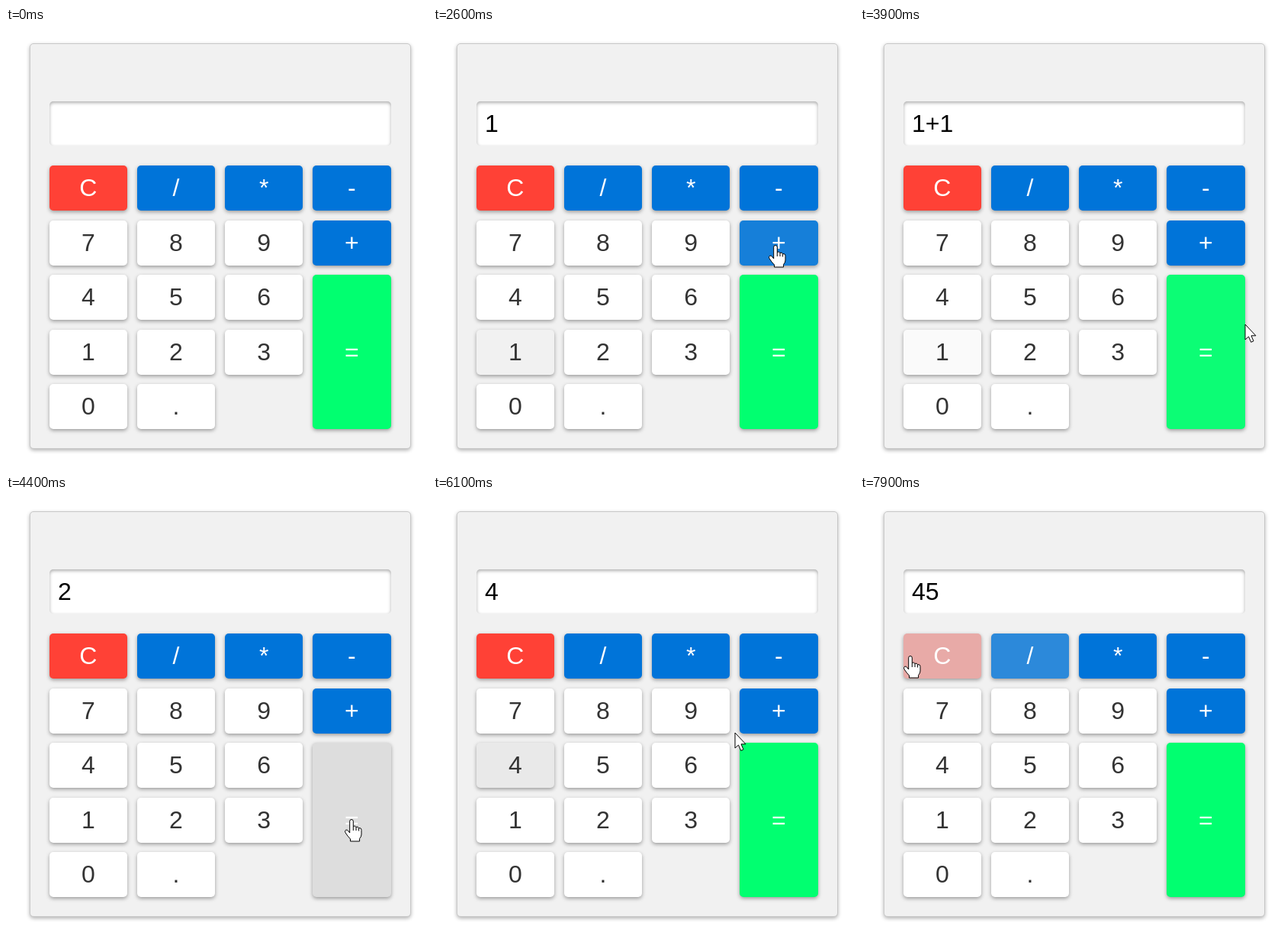
Recreate the animation shown at these times as an HTML page. Size 552 by 576 pixels, loop 8 s.

```html
<!DOCTYPE html>
<html lang="en">
<head>
<meta charset="utf-8">
<title>Calculator</title>
<style>
  html, body { margin: 0; width: 100%; height: 100%; overflow: hidden; background: #fff; }
  body { position: relative; font: 32px Arial, "Liberation Sans", sans-serif; }
  .panel, .display, .key, .cursor { position: absolute; box-sizing: border-box; }
  .panel {
    left: 31px; top: 20px; width: 500px; height: 531px;
    background: #f1f1f1; border: 1px solid #c8c8c8; border-radius: 5px;
    box-shadow: 0 2px 5px rgba(0, 0, 0, .3);
  }
  .display {
    left: 57px; top: 96px; width: 448px; height: 58px; padding-left: 11px;
    line-height: 58px; white-space: pre; color: #000; background: #fff;
    border-radius: 5px; box-shadow: inset 0 2px 4px rgba(0, 0, 0, .32);
  }
  .key {
    display: flex; align-items: center; justify-content: center;
    border-radius: 5px; box-shadow: 0 2px 5px rgba(0, 0, 0, .36);
  }
  .cursor { left: 0; top: 0; overflow: visible; }
  .cursor path { fill: #fff; stroke: #000; stroke-linejoin: round; }
  .cursor .lines { fill: none; }
</style>
</head>
<body>
<div class="panel"></div>
<div class="display"></div>
<svg class="cursor" width="1" height="1">
  <path class="arrow" d="M0 0V20L4.5 16L7.7 23.3L11 21.8L8 14.8H14Z"/>
  <g class="hand">
    <path d="M-2.3 17V1.8Q-2.3 -.5 0 -.5T2.3 1.8V8.5Q4.5 7 6 9.4Q8.6 8.2 9.6 10.8Q13 10 13 13.5V19Q13 22 10.6 24.5V28H-1.5V25Q-5 21.5 -8 16.7Q-9.2 14.5 -7.4 13.2Q-5.5 12.2 -3.8 15Z"/>
    <path class="lines" d="M2.3 8.5V14M6 9.4V14M9.6 10.8V14.5"/>
  </g>
</svg>
<script>
const LOOP = 8000, STEP = 100, TICK = 10, FADE = 400;
const COLORS = { 'C': [255, 65, 54], '=': [1, 255, 112] };
const WHITE = [255, 255, 255], BLUE = [0, 116, 217];
const $ = selector => document.querySelector(selector);
const display = $('.display'), cursor = $('.cursor'), arrow = $('.arrow'), hand = $('.hand');
const clamp = v => Math.max(0, Math.min(1, v));

const keys = {};
['C/*-', '789+', '456=', '123', '0.'].forEach((row, r) => {
  [...row].forEach((label, c) => {
    const el = document.createElement('div');
    const x = 56.6 + 115.2 * c, y = 180 + 71.5 * r;
    const w = 102.4, h = label === '=' ? 202 : 59;
    const number = /[\d.]/.test(label);
    el.className = 'key';
    el.textContent = label;
    el.style.cssText = `left:${x}px;top:${y}px;width:${w}px;height:${h}px;color:${number ? '#333' : '#fff'}`;
    document.body.insertBefore(el, cursor);
    keys[label] = {
      el, x, y, w, h,
      color: COLORS[label] || (number ? WHITE : BLUE),
      hover: number ? 230 : 221
    };
  });
});

// The pointer rests near the centre of a key, offset by dx and dy.
function rest(label, arrive, leave, dx = 0, dy = 0) {
  const k = keys[label];
  return { label, arrive, leave, x: k.x + k.w / 2 + dx, y: k.y + k.h / 2 + dy };
}

// A press comes late in the rest.
function press(...args) {
  const stop = rest(...args);
  return { ...stop, click: stop.arrive + .8 * (stop.leave - stop.arrive) };
}

const stops = [
  rest('4', 1100, 1100, -106, -97),
  rest('4', 1400, 1720),
  press('1', 1800, 2400, 35, 1),
  press('+', 2600, 2985, -4, 4),
  press('1', 3165, 3550, 10, 16),
  rest('=', 3640, 3870, -58, -36),
  rest('=', 3900, 3950, 51.5, -36),
  press('=', 4100, 4450),
  press('C', 4650, 5130, -8, -14),
  press('4', 5300, 6040, 7, -2),
  rest('+', 6118, 6150, -14, 23),
  rest('=', 6220, 6350, 0, -70),
  press('5', 6600, 6900),
  rest('*', 7000, 7200),
  rest('/', 7270, 7520, -23, 3),
  rest('C', 7800, LOOP, -42)
];

function pointAt(t) {
  const i = stops.findIndex(s => s.leave > t);
  const a = stops[i - 1], b = stops[i];
  if (!a) return null;
  const k = clamp((t - a.leave) / (b.arrive - a.leave));
  const e = k * k * (3 - 2 * k);
  return { x: a.x + (b.x - a.x) * e, y: a.y + (b.y - a.y) * e };
}

const inside = (p, k) => p && p.x > k.x && p.x < k.x + k.w && p.y > k.y && p.y < k.y + k.h;

// Each key's hover colour follows the pointer up to time t.
function hoverLevel(key, t) {
  let level = 0;
  for (let s = stops[0].arrive; s < t; s += TICK) {
    level = clamp(level + (inside(pointAt(s), key) ? 1 : -1) * TICK / FADE);
  }
  return level;
}

function enter(text, label) {
  if (label === 'C') return '';
  if (label === '=') return String(text.split('+').reduce((sum, n) => sum + Number(n), 0));
  return text + label;
}

function drawCursor(p) {
  cursor.style.display = p ? '' : 'none';
  if (!p) return;
  const over = Object.values(keys).some(k => inside(p, k));
  cursor.style.transform = `translate(${Math.round(p.x)}px,${Math.round(p.y)}px)`;
  arrow.style.display = over ? 'none' : '';
  hand.style.display = over ? '' : 'none';
}

function draw(t) {
  for (const key of Object.values(keys)) {
    const k = hoverLevel(key, t);
    const rgb = key.color.map(v => Math.round(v + (key.hover - v) * k));
    key.el.style.background = `rgb(${rgb})`;
  }
  display.textContent = stops.filter(s => s.click <= t).reduce((text, s) => enter(text, s.label), '');
  drawCursor(pointAt(t));
}

const origin = performance.now();
let shown = -1;
function tick() {
  const t = (performance.now() - origin) % LOOP;
  const step = Math.floor(t / STEP) * STEP;
  if (step !== shown) draw(shown = step);
  requestAnimationFrame(tick);
}
tick();
</script>
</body>
</html>
```
